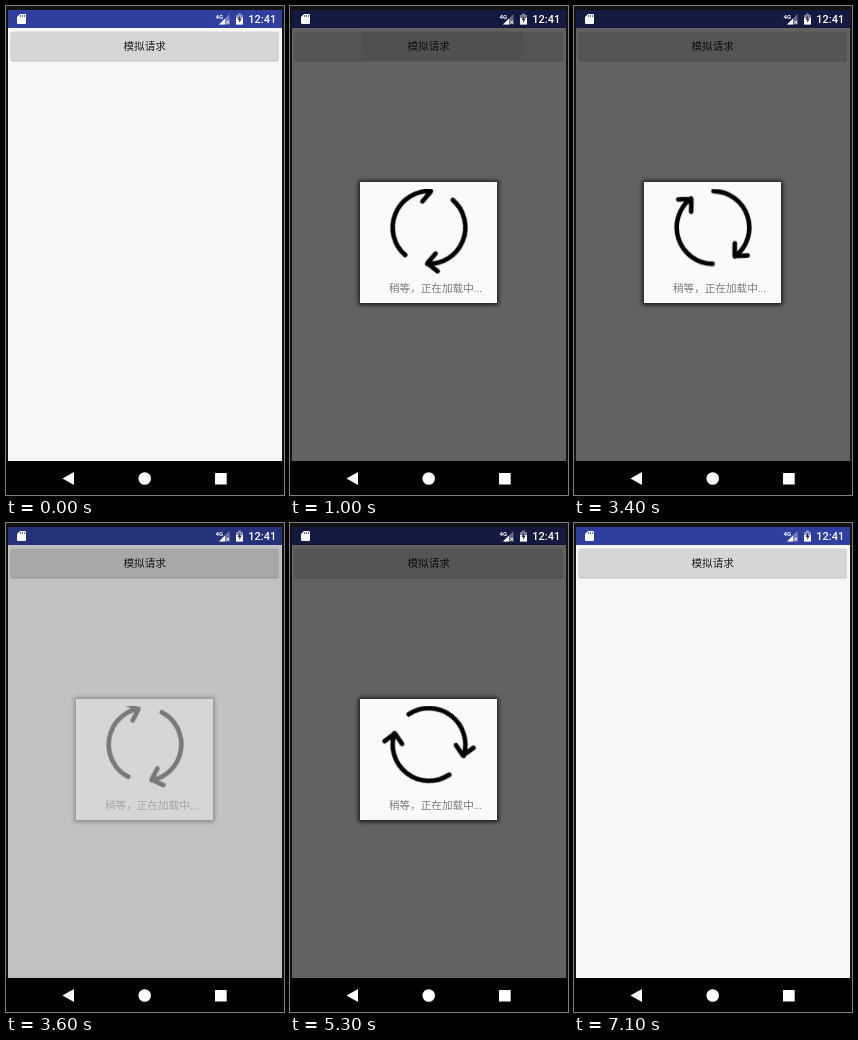
Recreate the animation shown at these times as an HTML page. Size 278 by 489 pixels, loop 7900 ms.

```html
<!DOCTYPE html>
<html lang="zh-CN">
<head>
<meta charset="utf-8">
<title>模拟请求</title>
<style>
  html, body { margin: 0; height: 100%; overflow: hidden; background: #121212; }
  svg { display: block; font: 10.6px Roboto, "Noto Sans CJK SC", "Noto Sans CJK", sans-serif; }
  .soft { filter: blur(2px); }
  #spinner { fill: none; stroke: #000; stroke-width: 4.6; stroke-linecap: round; stroke-linejoin: round; filter: blur(.35px); }
</style>
</head>
<body>
<svg width="278" height="489" viewBox="0 0 278 489">
  <defs>
    <clipPath id="buttonClip"><rect x="4.5" y="25.5" width="268.5" height="29" rx="2"/></clipPath>
    <clipPath id="iconClip"><rect x="70" y="183" width="137" height="113"/></clipPath>
    <path id="arrow" d="M0-36.4A36.4 36.4 0 0 1 22.3 28.7M22 15.5V28.2L35 27.6"/>
  </defs>

  <!-- App window -->
  <rect x="2" y="4" width="274" height="451" fill="#f7f7f7"/>
  <rect x="2" y="4" width="274" height="18" fill="#303f9f"/>
  <rect x="4.5" y="26.5" width="268.5" height="29" rx="2" fill="#c2c2c2"/>
  <rect x="4.5" y="25.5" width="268.5" height="29" rx="2" fill="#d6d6d6"/>
  <g clip-path="url(#buttonClip)"><circle id="ripple" cx="152" cy="40"/></g>
  <text x="138.7" y="44.3" text-anchor="middle" fill="#222">模拟请求</text>
  <rect id="dim" x="2" y="4" width="274" height="451"/>

  <!-- Loading dialog -->
  <g id="dialog">
    <rect class="soft" x="68.5" y="174.5" width="140" height="124.5" opacity=".75"/>
    <rect x="70" y="176" width="137" height="121" fill="#fafafa"/>
    <g clip-path="url(#iconClip)">
      <g id="spinner">
        <use href="#arrow"/>
        <use href="#arrow" transform="rotate(180)"/>
      </g>
    </g>
    <text x="99" y="286" fill="#7c7c7c">稍等，正在加载中...</text>
  </g>

  <!-- System bars -->
  <g fill="#fff">
    <path d="M14 8h5q1 0 1 1v8q0 1-1 1h-7q-1 0-1-1v-6z"/>
    <path d="M14.5 9v2M16.5 9v2M18.5 9v2" stroke="#303f9f" stroke-width=".8"/>
    <text x="209.5" y="12.5" font-size="6" font-weight="700">4G</text>
    <path d="M223.500 8v10.500h-10.500z" opacity=".35"/>
    <path d="M219 12.500v6h-6z"/>
    <path d="M220.300 14.800l3 3m0-3l-3 3" stroke="#fff"/>
    <path d="M232 7.500h3v1.500h2v9.500h-7v-9.500h2z" opacity=".45"/>
    <path d="M230 12h7v6.500h-7z"/>
    <path d="M234 9.500l-2.500 4.500h1.700v3l2.500-4.500h-1.700z" fill="#303050"/>
    <text x="242.300" y="17" font-size="11" font-weight="500">12:41</text>
  </g>
  <path d="M0 455h278v34H0z"/>
  <g fill="#fff">
    <path d="M56.500 472.500L68 466v13z"/>
    <circle cx="138.700" cy="472.500" r="6.300"/>
    <rect x="209" y="467" width="11.700" height="11.500" rx=".6"/>
  </g>
</svg>
<script>
  const LOOP = 7900, STEP = 100, TURN = 2700, FADE = 200;
  const requests = [
    { click: 680, show: 695, dismiss: 3480 },
    { click: 4080, show: 4205, dismiss: 6905 },
  ];
  const [ripple, dim, dialog, spinner] =
    ['ripple', 'dim', 'dialog', 'spinner'].map(id => document.getElementById(id));
  const clamp = x => Math.min(1, Math.max(0, x));

  function draw(time) {
    const t = Math.floor(time % LOOP / STEP) * STEP;
    const { click, show, dismiss } = requests[t < 3900 ? 0 : 1];
    const age = t - click;
    const leaving = 1 - clamp((t - dismiss) / (FADE - 10));

    ripple.setAttribute('r', Math.max(0, 17 + age * 0.2));
    ripple.setAttribute('opacity', age < 0 ? 0 : 0.1 * clamp((500 - age) / 280));
    dim.setAttribute('opacity', 0.6 * clamp((t - show) / FADE) * leaving);
    dialog.setAttribute('opacity', clamp((t - show) / 90) * leaving);
    spinner.setAttribute('transform', `translate(139 221.5) rotate(${(t - show) / TURN * 360})`);
  }

  const start = performance.now();
  function tick() {
    draw(performance.now() - start);
    requestAnimationFrame(tick);
  }
  tick();
</script>
</body>
</html>
```
